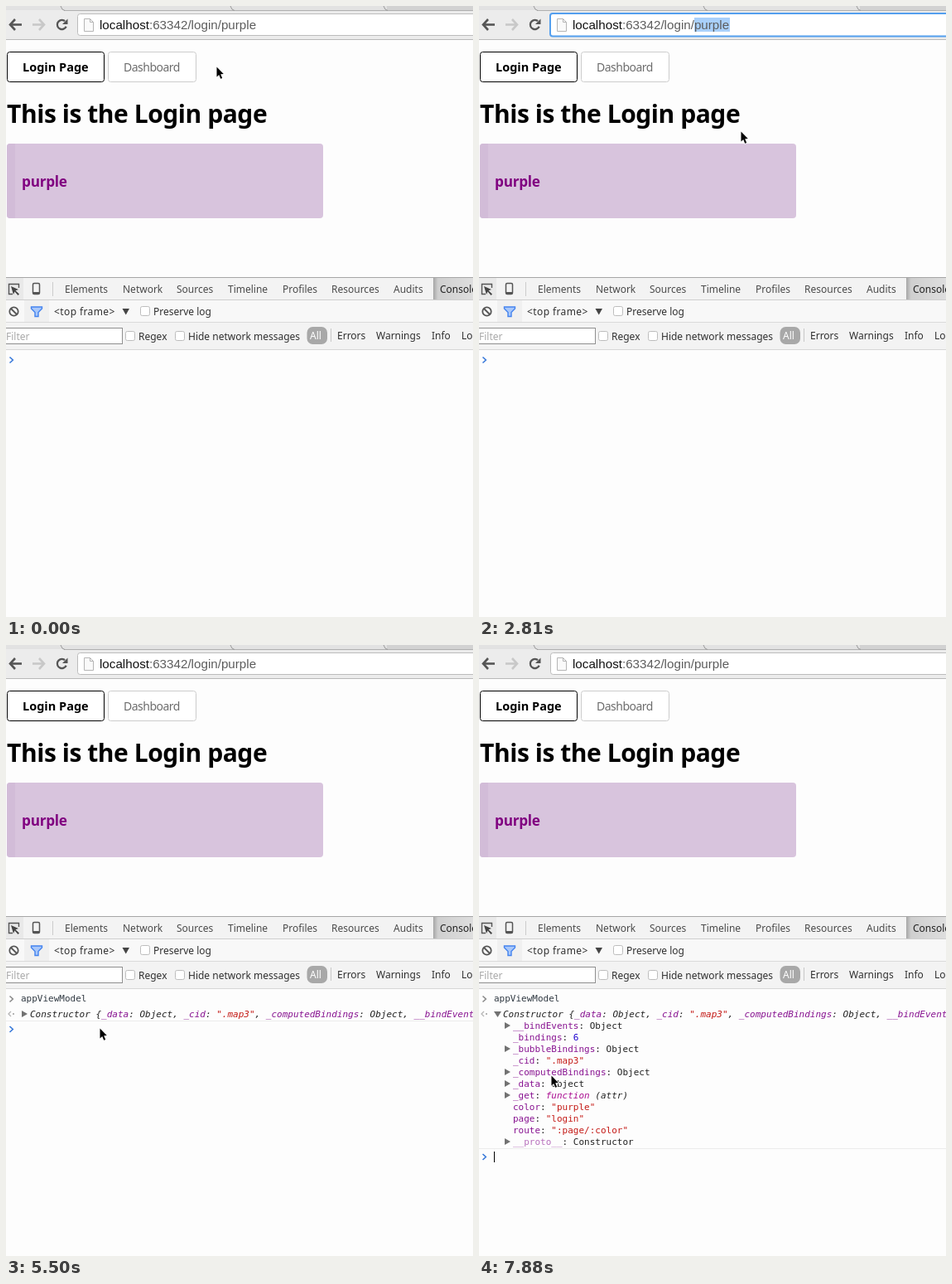
Animation, 564 px wide and 737 px high, one loop 8000 ms. Source, as an HTML page with a canvas:

```html
<!DOCTYPE html>
<html lang="en">
<head>
<meta charset="utf-8">
<title>Login page</title>
<style>
  html, body { margin: 0; width: 100%; height: 100%; overflow: hidden; background: #fdfdfd; }
  canvas { display: block; }
</style>
</head>
<body>
<canvas id="stage" width="564" height="737"></canvas>
<script>
const ctx = document.getElementById('stage').getContext('2d');
const LOOP = 8000;
const SANS = '"Noto Sans", "Open Sans", sans-serif';
const URL_FONT = '15.2px "Liberation Sans", Arial, sans-serif';
const MONO = '11px "DejaVu Sans Mono", monospace';
const UI = '12px ' + SANS;
const INK = '#222', PURPLE = '#881391', RED = '#c41a16', BLUE = '#3879d9', GREY = '#555';

// Key moments in ms
const FOCUS = 585, PICK_PAGE = 730, UNPICK = 1780, PICK_COLOR = 1920, BLUR = 3710;
const PROMPT = 3860, TYPE = 5050, RUN = 5500, OPEN = 6690;

// Pointer glides; each advances in a few even steps
const GLIDES = [
  { from: 150, to: 730, steps: 5, x: 237, y: 25 },
  { from: 1180, to: 1480, steps: 3, x: 277, y: 27 },
  { from: 2520, to: 3410, steps: 7, x: 113, y: 462, bend: 110 },
  { from: 6100, to: 6540, steps: 4, x: 21, y: 447 },
  { from: 7590, to: 7880, steps: 3, x: 87, y: 519 }
];

function pointerAt(t) {
  let x = 254, y = 73;
  for (const g of GLIDES) {
    if (t < g.from) break;
    const done = (t - g.from) / (g.to - g.from) * (g.steps - 1);
    const p = Math.min(1, (Math.floor(done) + 1) / g.steps);
    x += (g.x - x) * p + (g.bend || 0) * Math.sin(Math.PI * p);
    y += (g.y - y) * p;
  }
  return { x, y };
}

// The blink restarts whenever the prompt gets focus or input
function caretOn(t) {
  if (t < 150 || (t >= FOCUS && t < PROMPT) || (t >= RUN && t < RUN + 150)) return false;
  const since = [150, PROMPT, TYPE, RUN + 150, OPEN].filter(s => s <= t).pop();
  return (t - since) % 890 < 450;
}

function text(s, x, y, font = UI, color = '#303030', spacing = 0) {
  ctx.font = font;
  ctx.letterSpacing = spacing + 'px';
  ctx.fillStyle = color;
  ctx.fillText(s, x, y);
  return ctx.measureText(s).width;
}

function row(words, x, y, gap, color) {
  for (const s of words) x += text(s, Math.round(x), y, UI, color) + gap;
}

function box(x, y, w, h, color) {
  ctx.fillStyle = color;
  ctx.fillRect(x, y, w, h);
}

function paint(fill, stroke, lw = 1) {
  if (fill) { ctx.fillStyle = fill; ctx.fill(); }
  if (stroke) { ctx.strokeStyle = stroke; ctx.lineWidth = lw; ctx.stroke(); }
}

function round(x, y, w, h, r, fill, stroke, lw) {
  ctx.beginPath();
  ctx.roundRect(x, y, w, h, r);
  paint(fill, stroke, lw);
}

function line(points, color, lw) {
  ctx.beginPath();
  for (let i = 0; i < points.length; i += 2) ctx.lineTo(points[i], points[i + 1]);
  paint(null, color, lw);
}

function poly(points, fill, stroke, lw) {
  ctx.beginPath();
  for (let i = 0; i < points.length; i += 2) ctx.lineTo(points[i], points[i + 1]);
  ctx.closePath();
  paint(fill, stroke, lw);
}

function arc(x, y, r, a, b, color, lw) {
  ctx.beginPath();
  ctx.arc(x, y, r, a, b);
  paint(null, color, lw);
}

function navArrow(x, dir, color) {
  line([x + dir, 22.5, x + dir * 15, 22.5], color, 2.6);
  line([x + dir * 7, 16, x + dir, 22.5, x + dir * 7, 29], color, 2.6);
}

function browserBar(t) {
  box(0, 0, 564, 5, '#d2d2d2');
  box(0, 0, 460, 5, '#e2e2e2');
  box(0, 5, 564, 35, '#ececec');
  box(70, 5, 494, 1, '#b0b0b0');
  for (const x of [66, 271, 456]) line([x, 0, x + 2, 4, x + 5, 5.5], '#999');
  box(0, 40, 564, 1, '#b8b8b8');

  navArrow(4, 1, GREY);
  navArrow(47, -1, '#c8c8c8');
  arc(67.5, 22.5, 5.6, 0.4, 5.4, GREY, 2.3);
  poly([74.5, 15.5, 74.5, 22, 68, 22], GREY);

  if (t >= FOCUS && t < BLUR) round(86, 9, 490, 27.5, 3, '#fff', '#549fee', 2);
  else round(86.5, 9.5, 490, 26, 3, '#fff', '#bcbcbc');
  poly([94.5, 15.5, 101.5, 15.5, 105.5, 19.5, 105.5, 30.5, 94.5, 30.5], '#fafafa', '#b5b5b5');
  line([101.5, 15.5, 101.5, 19.5, 105.5, 19.5], '#b5b5b5');

  if (t >= PICK_PAGE && t < UNPICK) box(224, 14, 33, 17, '#a9d0fb');
  if (t >= PICK_COLOR && t < BLUR) box(260, 14, 43, 17, '#a9d0fb');
  const host = text('localhost', 113, 28, URL_FONT, '#111');
  text(':63342/login/purple', 113 + host, 28, URL_FONT, '#5c5c5c');
}

function page() {
  round(1.5, 55.5, 117, 36, 3, '#fff', '#000');
  round(123.5, 55.5, 106, 36, 3, '#fff', '#ccc');
  text('Login Page', 20, 79, 'bold 14.5px ' + SANS, '#000');
  text('Dashboard', 142, 79, '14px ' + SANS, '#6c6c6c', -0.5);
  text('This is the Login page', 1, 141, 'bold 30px ' + SANS, '#000', -0.45);
  round(1, 166, 382, 90, 4, '#d8c4dd');
  round(1, 166, 10, 90, [4, 0, 0, 4], '#d2bcd8');
  text('purple', 19, 218, 'bold 17.2px ' + SANS, '#800080', -0.25);
}

function checkbox(x, y, label) {
  round(x + 0.5, y + 0.5, 11, 11, 2, '#fff', '#bdbdbd');
  text(label, x + 16, y + 11);
}

function devtools() {
  box(0, 327, 564, 88, '#f3f3f3');
  box(0, 327, 564, 1, '#a6a6a6');
  box(0, 328, 21, 26, '#e9e9e9');
  box(0, 354, 564, 1, '#cfcfcf');
  box(0, 355, 564, 26, '#f8f8f8');
  box(0, 381, 564, 1, '#dadada');
  box(0, 414, 564, 1, '#d6d6d6');

  // Tab row
  line([8, 347.5, 3.5, 347.5, 3.5, 335.5, 15.5, 335.5, 15.5, 340], GREY, 1.4);
  poly([6, 338, 15, 342, 11.5, 343.3, 16, 347.5, 14.5, 349, 10.5, 344.5, 9, 348], '#444');
  round(32.5, 334.5, 8, 13, 1.5, null, GREY, 1.5);
  box(33, 345, 7, 2, GREY);
  box(56, 333, 1, 17, '#ccc');
  row(['Elements', 'Network', 'Sources', 'Timeline', 'Profiles', 'Resources', 'Audits'],
    71, 346, 17.5, '#4a4a4a');
  const shade = ctx.createLinearGradient(516, 0, 564, 0);
  shade.addColorStop(0, '#a6a6a6');
  shade.addColorStop(0.12, '#cfcfcf');
  shade.addColorStop(1, '#dedede');
  box(516, 328, 48, 26, shade);
  text('Console', 524, 346, UI, INK);

  // Frame row
  arc(9.5, 368.5, 5.2, 0, 7, GREY, 1.8);
  line([6, 365, 13, 372], GREY, 1.8);
  box(22, 355, 30, 26, '#f0f0f0');
  poly([30.5, 363, 43.5, 363, 43.5, 365, 39, 369.5, 39, 374.5, 35, 374.5, 35, 369.5, 30.5, 365],
    '#a9c8fa', '#4483ee', 1.4);
  text('<top frame>', 58, 373, UI, '#303030', 0.4);
  poly([140.5, 365, 149, 365, 144.75, 372.5], '#444');
  checkbox(162, 362, 'Preserve log');

  // Filter row
  box(-1, 388, 142, 20, '#8f8f8f');
  box(0, 389, 140, 18, '#fff');
  text('Filter', 0, 403, UI, '#a9a9a9');
  checkbox(144, 392, 'Regex');
  checkbox(204, 392, 'Hide network messages');
  round(363.5, 387, 24.5, 21, 7, '#a8a8a8');
  text('All', 367, 402, UI, '#fff');
  box(392, 389, 1, 16, '#c8c8c8');
  row(['Errors', 'Warnings', 'Info', 'Logs'], 400, 402, 13);
}

function chevron(y, color) {
  line([4.5, y - 3.5, 8.3, y, 4.5, y + 3.5], color, 1.6);
}

function triangle(x, y, open) {
  poly(open ? [x - 1, y - 3, x + 8, y - 3, x + 3.5, y + 4]
            : [x, y - 4, x + 7, y, x, y + 4], '#727272');
}

// Draws [string, color] runs side by side
function runs(list, x, y, style = '') {
  for (const [s, color = INK] of list) x += text(s, x, y, style + ' ' + MONO, color);
  return x;
}

const PROPS = {
  __bindEvents: 'Object',
  _bindings: '6',
  _bubbleBindings: 'Object',
  _cid: '".map3"',
  _computedBindings: 'Object',
  _data: 'Object',
  _get: 'function (attr)',
  color: '"purple"',
  page: '"login"',
  route: '":page/:color"',
  __proto: 'Constructor'
};

function property(key, value, y) {
  const proto = key === '__proto';
  const plain = /^["\d]/.test(value);
  if (!plain) triangle(31, y);
  const x = runs([[proto ? '__proto__' : key, proto ? '#b871bd' : PURPLE], [': ']], 41, y + 4);
  const [head, tail] = value.split(' ');
  if (tail) runs([[head, '#aa0d91'], [' ' + tail]], x, y + 4, 'italic');
  else runs([[value, !plain ? INK : value[0] === '"' ? RED : '#1c00cf']], x, y + 4);
}

function output(open) {
  chevron(427, '#8a8a8a');
  line([6, 442, 3, 445, 6, 448], '#b5b5b5', 1.3);
  box(8, 444, 2, 2, '#b5b5b5');
  triangle(19, 445, open);
  runs([['Constructor {'], ['_data', PURPLE], [': Object, '], ['_cid', PURPLE], [': '],
    ['".map3"', RED], [', '], ['_computedBindings', PURPLE], [': Object, '],
    ['__bindEvents', PURPLE], [': Object']], 29, 449, 'italic');
  if (open) Object.entries(PROPS).forEach(([k, v], i) => property(k, v, 459 + 14 * i));
  box(0, open ? 607 : 453, 564, 1, '#ececec');
}

function consolePane(t) {
  const typed = t >= TYPE, ran = t >= RUN, open = t >= OPEN;
  const y = open ? 617.5 : ran ? 463.5 : 427;
  if (typed) text('appViewModel', 18, 430, MONO, '#303942');
  if (ran) output(open);
  chevron(y, BLUE);
  if (caretOn(t)) box(typed && !ran ? 97 : 18, Math.ceil(y) - 7, 1, 13, '#000');
}

function pointer(t) {
  const { x, y } = pointerAt(t);
  ctx.save();
  ctx.translate(Math.round(x), Math.round(y));
  if (t >= 1180 && t < 2520) {
    for (const side of [-1, 1])
      line([0.5 + side * 3, -7.5, 0.5 + side, -7.5, 0.5, -6, 0.5, 6, 0.5 + side, 7.5, 0.5 + side * 3, 7.5], INK, 1.1);
    line([-1.5, 3, 2.5, 3], INK, 1.1);
  } else {
    const shape = [0.5, 0.5, 0.5, 12.5, 3.2, 10, 5.2, 14.8, 7.2, 14, 5.2, 9.3, 8.8, 9];
    poly(shape, '#000', '#fff', 1.6);
    poly(shape, '#000');
  }
  ctx.restore();
}

function draw(t) {
  box(0, 0, 564, 737, '#fdfdfd');
  browserBar(t);
  page();
  devtools();
  consolePane(t);
  pointer(t);
}

const start = performance.now();
function tick() {
  draw((performance.now() - start) % LOOP);
  requestAnimationFrame(tick);
}
tick();
</script>
</body>
</html>
```
